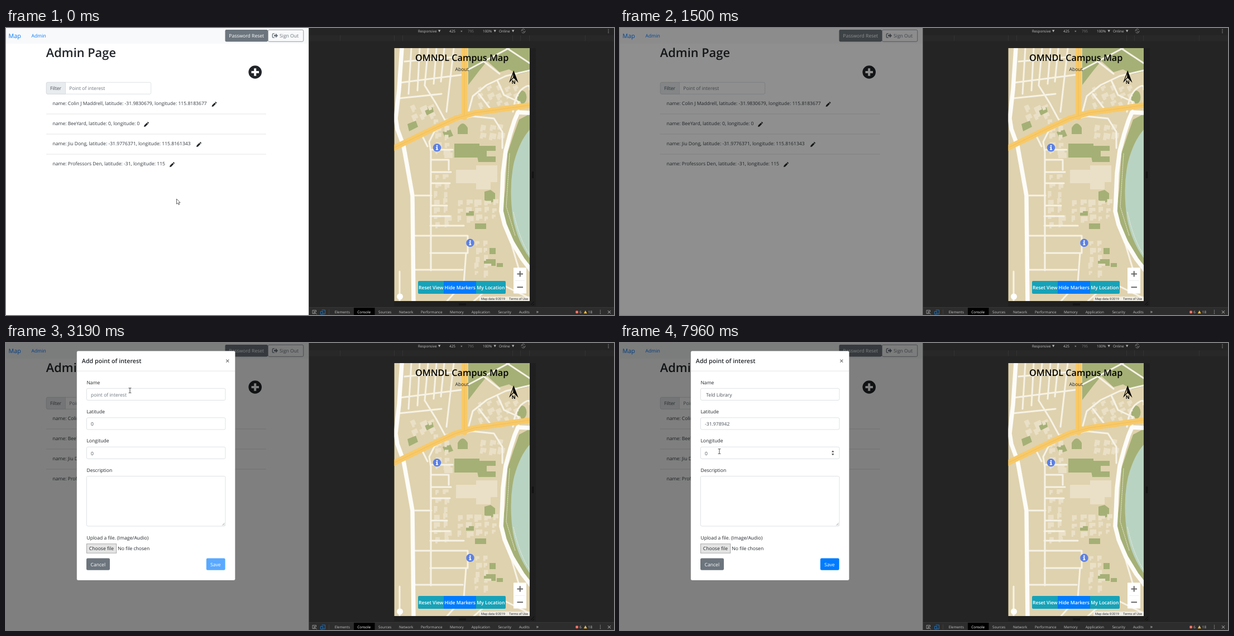
An HTML page that plays this animation: 1089x514 px, repeating every 8 s.

```html
<!DOCTYPE html>
<html lang="en">
<head>
<meta charset="utf-8">
<title>Admin page and campus map</title>
<style>
html, body { margin: 0; width: 100%; height: 100%; overflow: hidden; background: #242424 }
svg { display: block; width: 100%; height: 100%; font: 8.58px "Open Sans", "Noto Sans", sans-serif; fill: #212529; text-rendering: geometricPrecision }
.semi { font-weight: 600 }
.mid { text-anchor: middle }
.link { fill: #007bff }
.gray { fill: #6c757d }
.white { fill: #fff }
.value { fill: #495057 }
.box { fill: #fff; stroke: #ced4da; stroke-width: .7 }
.rule { stroke: #dfdfdf; stroke-width: .8 }
.tools { font-size: 6.35px; fill: #c4c4c4 }
.line { fill: none; stroke-linejoin: round; stroke-linecap: round }
.street { stroke: #f6f2e6; stroke-width: 3 }
.avenue { stroke: #fdfcf8; stroke-width: 7.5 }
.park { fill: #a5b076 }
</style>
</head>
<body>
<svg viewBox="0 0 1089 514" preserveAspectRatio="none">
<defs>
  <clipPath id="mapClip"><path d="M695.5 36H938V489H695.5Z"/></clipPath>
  <clipPath id="appClip"><path d="M0 0H542V514H0Z"/></clipPath>
  <path id="pencil" d="M0 9L.7 6.3L5.3 1.7L7.4 3.8L2.8 8.4ZM5.9 1.1L6.7.3Q7.2-.1 7.7.4L8.7 1.4Q9.1 1.9 8.7 2.4L7.9 3.2Z"/>
  <path id="drop" d="M0 0H4.4L2.2 4Z" fill="#bbb"/>
  <path id="kebab" class="line" d="M0 0V6" stroke="#bbb" stroke-width="1.4" stroke-dasharray="0 2.9"/>
  <g id="pin">
    <circle r="7.2" fill="#5b80e6"/>
    <path d="M-1.9-1.2H1V2.8H2V4.1H-2V2.8H-.9V.1H-1.9Z" class="white"/><circle cy="-3.2" r="1.3" class="white"/>
  </g>
  <path id="spin" d="M0 3L2.2 0L4.4 3ZM0 5.6H4.4L2.2 8.6Z" fill="#444"/>
</defs>

<g clip-path="url(#appClip)">
  <path d="M0 0H542V514H0Z" class="white"/>
  <path d="M0 0H542V28H0Z" fill="#f8f9fa"/>
  <text x="4.5" y="18" class="link" font-size="10.73">Map</text>
  <text x="45.6" y="17" class="link">Admin</text>
  <rect x="392.5" y="3" width="76.5" height="21.5" rx="2.3" class="gray"/>
  <text x="399.3" y="17" class="white">Password Reset</text>
  <rect x="469.4" y="3.3" width="63.4" height="21" rx="2.3" fill="none" stroke="#6c757d" stroke-width=".7"/>
  <path d="M480.5 10.2H478.5Q477.3 10.2 477.3 11.4V16Q477.3 17.2 478.5 17.2H480.5" class="line" stroke="#6c757d" stroke-width="1.3"/>
  <path d="M480 12.3H483V9.6L487.2 13.7L483 17.8V15.1H480Z" class="gray"/>
  <text x="490" y="17" class="gray">Sign Out</text>
  <text x="71.8" y="52" class="semi" font-size="21.8">Admin Page</text>
  <circle cx="446.2" cy="79" r="11.8"/>
  <path d="M439.5 79H453M446.2 72.2V85.8" class="line" stroke="#fff" stroke-width="4" style="stroke-linecap:butt"/>
  <rect x="72.3" y="97.3" width="187.4" height="21" rx="2.3" class="box"/>
  <path d="M106.5 97.3H74.6Q72.3 97.3 72.3 99.6V116Q72.3 118.3 74.6 118.3H106.5Z" class="box" style="fill:#e9ecef"/>
  <text x="79" y="111.3" class="value">Filter</text>
  <text x="113.3" y="111.3" class="gray">Point of interest</text>
  <path d="M72 154H466M72 190H466M72 226H466" class="rule"/>
  <g fill="#343a40">
    <text x="83.4" y="138">name: Colin J Maddrell, latitude: -31.9830679, longitude: 115.8183677</text>
    <text x="83.4" y="174">name: BeeYard, latitude: 0, longitude: 0</text>
    <text x="83.4" y="210">name: Jiu Dong, latitude: -31.9776371, longitude: 115.8161343</text>
    <text x="83.4" y="246">name: Professors Den, latitude: -31, longitude: 115</text>
  </g>
  <use href="#pencil" x="368.5" y="132"/><use href="#pencil" x="247" y="168"/>
  <use href="#pencil" x="341" y="204"/><use href="#pencil" x="293" y="240"/>

  <path id="shade" d="M0 0H542V514H0Z" fill="#000"/>
  <g id="modal">
    <rect x="126.7" y="14.3" width="283.8" height="410.6" rx="2.6" class="white" stroke="#000" stroke-opacity=".2" stroke-width=".6"/>
    <text x="135.8" y="36.4" class="semi" font-size="10.73">Add point of interest</text>
    <path d="M394.3 29.6L399.3 34.6M399.3 29.6L394.3 34.6" stroke="#777" stroke-width="1.3"/>
    <path d="M127 50.2H410" class="rule"/>
    <g id="labels">
      <text x="144.4" y="73.5">Name</text>
      <text x="144.4" y="126">Latitude</text>
      <text x="144.4" y="178.4">Longitude</text>
      <text x="144.4" y="230.8">Description</text>
      <text x="144.4" y="351.8">Upload a file. (Image/Audio)</text>
    </g>
    <rect x="144.4" y="81.3" width="248.5" height="21.2" rx="2.3" class="box"/>
    <rect x="144.4" y="133.8" width="248.5" height="21.2" rx="2.3" class="box"/>
    <rect x="144.4" y="186.2" width="248.5" height="21.2" rx="2.3" class="box"/>
    <rect x="144.4" y="238.5" width="248.5" height="89.5" rx="2.3" class="box"/>
    <path d="M387.5 326.5L391.5 322.5M390 326.5L391.5 325" stroke="#777" stroke-width=".7"/>
    <g id="ring" fill="none">
      <rect x="143.3" y="80.2" width="250.7" height="23.4" rx="3" stroke="#007bff" stroke-opacity=".25" stroke-width="2"/>
      <rect x="144.4" y="81.3" width="248.5" height="21.2" rx="2.3" stroke="#80bdff" stroke-width=".8"/>
    </g>
    <text id="name" y="95.5"></text>
    <text id="lat" x="152" y="148" class="value"></text>
    <text x="152" y="200.5" class="value">0</text>
    <path id="caret" d="M0 0V11.5" stroke="#222" stroke-width=".8"/>
    <use id="latSpin" href="#spin" x="379" y="140.2"/>
    <use id="lonSpin" href="#spin" x="379" y="192.6"/>
    <rect x="144.4" y="359.8" width="53.4" height="16.4" fill="#e4e4e4" stroke="#999" stroke-width=".8"/>
    <text x="148.8" y="371.2">Choose file</text>
    <text x="200.3" y="371.2">No file chosen</text>
    <rect x="144" y="385.4" width="42" height="21.4" rx="2.3" class="gray"/>
    <text x="151.6" y="399.6" class="white">Cancel</text>
    <rect id="save" x="358.8" y="385.4" width="33.8" height="21.4" rx="2.3" class="link"/>
    <text x="366" y="399.6" class="white">Save</text>
  </g>
  <path id="arrow" d="M0 0V9.2L2.2 7.3L3.7 10.6L5.2 9.9L3.8 6.8H6.6Z" class="white" stroke="#222" stroke-width=".7"/>
  <path id="beam" d="M-2-4.3H-.6L0-3.8L.6-4.3H2M0-3.8V3.8M-2 4.3H-.6L0 3.8L.6 4.3H2" class="line" stroke="#222" stroke-width=".8"/>
</g>

<g class="tools">
  <path d="M542 0H1089V514H542Z" fill="#242424"/>
  <path d="M542 0H543V514H542Z" fill="#4a4a4a"/>
  <path d="M543 13H1089V23.5H543Z" fill="#282828"/>
  <path d="M598.5 13V23M695.5 13V23M710.5 13V23M907.5 13V23M921.5 13V23M937.5 13V23M1037.5 13V23" stroke="#373737" stroke-width=".8"/>
  <path d="M938 36H949V498H695.5V489H938Z" fill="#1f1f1f"/>
  <path d="M942.5 257V269M944.5 257V269M811 494H824M811 496H824M940 496L946 490M943 497L946 494" stroke="#090909" stroke-width=".9"/>
  <text x="738" y="7.8">Responsive</text><use href="#drop" x="774" y="3.6"/>
  <text x="794" y="7.8">425</text><text x="814" y="7.8">×</text><text x="827" y="7.8" fill="#777">795</text>
  <text x="854" y="7.8">100%</text><use href="#drop" x="873.5" y="3.6"/>
  <text x="883" y="7.8">Online</text><use href="#drop" x="906" y="3.6"/>
  <g class="line" stroke="#999" stroke-width=".8">
    <path d="M923 5.3A3.6 3.6 0 0 1 929 2.7M930 5.3A3.6 3.6 0 0 1 924 8M924.8 4L928.2 7.2"/>
  </g>
  <use href="#kebab" x="1079" y="2.6"/>

  <path d="M543 500.5H1089V514H543Z" fill="#2d2d2d"/>
  <path d="M543 500.5H1089" stroke="#3c3c3c" stroke-width=".8"/>
  <path d="M623 501H660.5V514H623Z" fill="#000"/>
  <path d="M554 511.5H549V505.5H555.5V508M552 508L556.5 512.5M552 508V511M552 508H555" class="line" stroke="#aaa" stroke-width=".8"/>
  <path d="M566 505H571.5V512H568.5M564 507.5H567.5V512.5H564Z" class="line" stroke="#1c77c9" stroke-width=".9"/>
  <path d="M578.5 504V513" stroke="#454545" stroke-width=".8"/>
  <text x="588.7" y="511">Elements</text><text x="629.3" y="511" class="white">Console</text>
  <text x="667" y="511">Sources</text><text x="704" y="511">Network</text>
  <text x="743" y="511">Performance</text><text x="795" y="511">Memory</text>
  <text x="833.7" y="511">Application</text><text x="881.4" y="511">Security</text>
  <text x="919" y="511">Audits</text><text x="949.4" y="511.4" font-size="9">»</text>
  <circle cx="1022.6" cy="508.7" r="2.7" fill="#e0503f"/><path d="M1021.4 507.5L1023.8 509.9M1023.8 507.5L1021.4 509.9" stroke="#fff" stroke-width=".6"/>
  <text x="1027.3" y="511">6</text>
  <path d="M1037.8 505.8L1040.7 511.2H1034.9Z" fill="#f5bd3c"/>
  <text x="1042.8" y="511">18</text>
  <use href="#kebab" x="1064.5" y="505.6"/>
  <path d="M1078 506.2L1083 511.2M1083 506.2L1078 511.2" stroke="#bbb" stroke-width="1"/>
</g>

<g clip-path="url(#mapClip)">
  <path d="M695 36H938V489H695Z" fill="#dfd2ae"/>
  <g class="park">
    <path d="M828 36H938V78L917 83L901 74L884 79L862 59L848 76L828 102Z"/>
    <path d="M938 154L919 164L909 192L898 225L894 290L889 330L900 362L920 402L938 432Z"/>
    <path d="M803 207H848V211H877V220H861V232H803ZM844 230H877V240H846ZM809 190V179Q818 163 827 179V190ZM782 186L796 182L801 193L787 198ZM719 172L734 166L738 177L722 185ZM746 146L763 138L766 150L749 159Z"/>
    <ellipse cx="924" cy="124" rx="8.5" ry="12"/>
    <path d="M857 293L868 290L876 296V310L865 314L857 308ZM824 328H838V336H824ZM840 350H860V360H840ZM866 394H877V405H866ZM856 414H877V426H856ZM879 421H890V428H879Z"/>
  </g>
  <g id="blocks" fill="#eae0c7"></g>
  <path d="M806 254H842V246H880V276H868V289H842V278H806ZM785 223H800V233H785Z" fill="#eae0c7"/>
  <path d="M938 182Q920 202 910 240Q900 285 908 340Q916 382 938 412Z" fill="#b9d3c2"/>
  <g class="line">
    <g class="street">
      <path d="M726 36L721 118M741 36L737 112M756 36L750 103M771 36L766 100M785 36L779 96M802 36L789 150M714 60L802 52M705 98L815 84M703 126L780 118M750 103L770 135L790 172"/>
      <path d="M897 36L938 63M901 36L829 74M938 76L895 86L861 102L836 122L829 148M856 60L884 82M847 118L870 148M880 94L892 120L918 132V148M908 150Q912 118 926 108T938 110"/>
      <path d="M761 434V222L758 204L768 184L802 166L835 158L874 162L889 186V215M763 218H800M762 236H793V254M762 258H797M762 278H795M762 318H790M760 337H795M760 354H820"/>
      <path d="M733 372H827V403M760 403H826M733 433H818M824 403L820 456L790 489M705 436V489M745 192L755 212M733 300H762"/>
      <path d="M838 489L864 466L889 460L938 484M889 340L905 386L921 440"/>
    </g>
    <path class="avenue" d="M709 36L704 110L698 162L701 181L712 211L720 255L728 300L730 489"/>
    <path class="avenue" d="M938 152L917 151L911 165L903 190L895 220L890 260L888 310L887 328L893 352L906 383L925 414L942 436" stroke-width="9"/>
    <path d="M909 330Q920 380 938 406M902 225L896 320L912 372" stroke="#f5f1e2" stroke-width=".8" stroke-dasharray="2 1.5"/>
    <path d="M821 36V160M690 217L760 183L805 162L840 152L940 138" stroke="#f8c967" stroke-width="10"/>
    <path d="M821 36V156M690 217L760 183L805 162L840 152L940 138" stroke="#e9b55a" stroke-width=".6"/>
  </g>
  <use href="#pin" x="772" y="214.3"/><use href="#pin" x="831.4" y="384.8"/>
  <text x="816.7" y="59" class="semi mid" font-size="16.2" fill="#000">OMNDL Campus Map</text>
  <text x="816.6" y="77" class="mid">About</text>
  <path d="M909.2 76L917.6 98L909.2 89.5L901 98L909.2 76V89.5" fill="#000"/>
  <path d="M908.3 82V88.5L904 93Z" fill="#dfd2ae"/>
  <text x="909.2" y="100" class="mid" font-size="8.6" font-weight="700" fill="#000">N</text>
  <g class="semi mid">
    <path d="M784 453H740Q738 453 738 455V474Q738 476 740 476H784ZM842 453H893Q895 453 895 455V474Q895 476 893 476H842Z" fill="#17a2b8"/>
    <path d="M784 453H842V476H784Z" class="link"/>
    <text x="761.3" y="467.6" class="white">Reset View</text>
    <text x="813.2" y="467.6" class="white">Hide Markers</text>
    <text x="868.4" y="467.6" class="white">My Location</text>
  </g>
  <rect x="909" y="429.3" width="23" height="46.2" rx="1" class="white"/>
  <path d="M912 452.4H929" stroke="#e6e6e6" stroke-width=".7"/>
  <path d="M915.5 440.4H926M920.7 435.2V445.6M915.5 464.2H926" stroke="#666" stroke-width="2"/>
  <circle cx="705.5" cy="481" r="5.5" class="white"/>
  <path d="M848 481H938V489H848Z" fill="#f5f5f5" opacity=".75"/>
  <g font-family="Roboto, Arial, sans-serif" font-size="5.75" fill="#333">
    <text x="851" y="487">Map data ©2019</text><text x="901" y="487">Terms of Use</text>
  </g>
</g>
</svg>
<script>
const $ = id => document.getElementById(id);
const ramp = (t, from, to) => Math.min(1, Math.max(0, (t - from) / (to - from)));
const show = (id, on) => $(id).setAttribute("opacity", +on);
const move = (id, x, y) => $(id).setAttribute("transform", `translate(${x} ${y})`);

// Scatter pale buildings: left, top, columns, rows, slant in degrees
let seed = 7;
const rand = () => (seed = seed * 16807 % 2147483647) / 2147483647;
let blocks = "";
for (const [left, top, cols, rows, slant] of [
  [766, 160, 2, 5, 0], [842, 104, 5, 3, -25], [766, 262, 2, 7, 0], [806, 306, 5, 3, 0],
  [838, 378, 2, 5, 0], [848, 170, 3, 2, 10], [722, 140, 3, 2, -25]]) {
  for (let i = 0; i < cols * rows; i++) {
    const x = left + i % cols * 16 + rand() * 4, y = top + Math.floor(i / cols) * 14 + rand() * 4;
    const w = 6 + rand() * 7, h = 4 + rand() * 6;
    blocks += `<path transform="rotate(${slant} ${x} ${y})" d="M${x} ${y}h${w}v${h}h${-w / 2}v3h${-w / 2}z"/>`;
  }
}
$("blocks").innerHTML = blocks;

// Pointer visits: time, x, y
const visits = [
  [[0, 305.5, 306], [310, 305.5, 306], [1110, 446, 80], [1180, 446, 80], [1360, 430.3, 93], [1480, -15, 170]],
  [[2870, -4, 66], [3190, 222, 85], [3300, 226, 90], [3570, 226, 90]],
  [[5230, -4, 140], [5560, 196, 145], [5830, 196, 145]],
  [[7570, 8, 177], [7950, 178, 194], [8000, 178, 194]]
];

function pointer(t) {
  const path = visits.find(v => t >= v[0][0] && t < v[v.length - 1][0]);
  if (!path) return null;
  const i = path.findIndex(k => t < k[0]);
  const [t0, x0, y0] = path[i - 1], [t1, x1, y1] = path[i];
  const p = ramp(t, t0, t1), e = p * p * (3 - 2 * p);
  return [x0 + (x1 - x0) * e, y0 + (y1 - y0) * e];
}

function render(t) {
  show("shade", .5 * ramp(t, 1338, 1523));
  show("modal", ramp(t, 1560, 1660));
  move("modal", 0, -28 * (1 - ramp(t, 1560, 1860)) ** 2);

  const named = t >= 3570, located = t >= 5830;
  $("name").textContent = named ? "Teld Library" : "point of interest";
  $("name").setAttribute("x", named ? 154.2 : 152);
  $("name").setAttribute("class", named ? "value" : "gray");
  $("lat").textContent = located ? "-31.978942" : "0";
  $("save").setAttribute("fill-opacity", named ? 1 : .65);

  const onLat = t > 5000;
  show("ring", onLat ? ramp(t, 5600, 5750) - ramp(t, 6460, 6640) : ramp(t, 3380, 3530) - ramp(t, 4300, 4430));
  move("ring", 0, onLat ? 52.5 : 0);
  show("caret", t >= 3570 && t < 4070 || located && t < 6460);
  move("caret", onLat ? 197 : 201.5, onLat ? 138.5 : 86.3);

  const at = pointer(t), [x, y] = at || [-50, -50];
  const within = top => x > 144 && x < 393 && y > top && y < top + 21.2;
  const typing = t > 1900 && [81.3, 133.8, 186.2].some(within);
  move("arrow", x, y);
  move("beam", x, y);
  show("arrow", at && !typing);
  show("beam", at && typing);
  show("latSpin", within(133.8) && t > 1900 || t >= 5600 && t < 6460);
  show("lonSpin", within(186.2) && t > 1900);
}

const start = performance.now();
function tick() {
  render((performance.now() - start) % 8000);
  requestAnimationFrame(tick);
}
tick();
</script>
</body>
</html>
```
